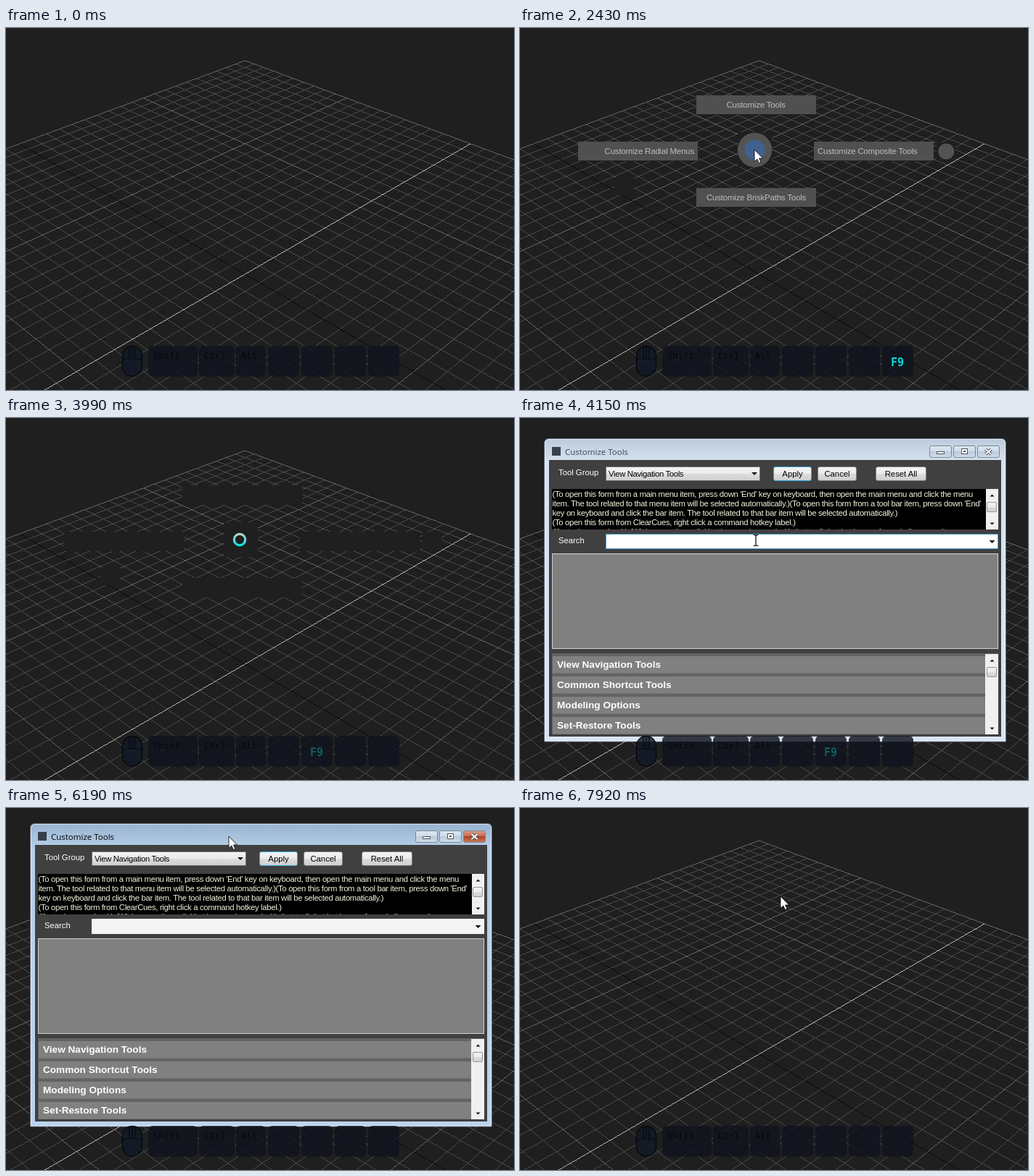
Animation, 700 px wide and 500 px high, one loop 8000 ms. Source, as an HTML page:

```html
<!DOCTYPE html>
<html lang="en">
<head>
<meta charset="utf-8">
<title>Customize Tools</title>
<style>
html, body { margin: 0; width: 100%; height: 100%; overflow: hidden; background: #1f1f1f; }
svg { display: block; width: 700px; height: 500px; }
text { font-family: "Liberation Sans", Arial, sans-serif; font-size: 11.3px; white-space: pre; }
.mid { text-anchor: middle; }
.end { text-anchor: end; }
.mono { font-family: "DejaVu Sans Mono", monospace; font-size: 12.5px; }
.menu text { font-size: 11.5px; letter-spacing: -.2px; fill: #bdbdbd; }
.tight { letter-spacing: -.33px; }
.caption { font-family: "Open Sans", sans-serif; font-size: 11.5px; }
.row { font-size: 13.6px; font-weight: bold; fill: #fff; }
</style>
</head>
<body>
<svg viewBox="0 0 700 500" xmlns="http://www.w3.org/2000/svg">
  <defs>
    <linearGradient id="face" x2="0" y2="1">
      <stop offset="0" stop-color="#f4f4f4"/><stop offset=".5" stop-color="#ebebeb"/>
      <stop offset=".5" stop-color="#dddddd"/><stop offset="1" stop-color="#cfcfcf"/>
    </linearGradient>
    <linearGradient id="hot" x2="0" y2="1">
      <stop offset="0" stop-color="#eaf6fd"/><stop offset=".5" stop-color="#d9f0fc"/>
      <stop offset=".5" stop-color="#bee6fd"/><stop offset="1" stop-color="#a7d9f5"/>
    </linearGradient>
    <linearGradient id="idle" x2="0" y2="1">
      <stop offset="0" stop-color="#bccbdc"/><stop offset=".08" stop-color="#d6e2ef"/><stop offset="1" stop-color="#d9e5f2"/>
    </linearGradient>
    <linearGradient id="live" x2="0" y2="1">
      <stop offset="0" stop-color="#98b3d0"/><stop offset=".08" stop-color="#b6cfe9"/><stop offset="1" stop-color="#bcd4ee"/>
    </linearGradient>
    <linearGradient id="red" x2="0" y2="1">
      <stop offset="0" stop-color="#dda08c"/><stop offset=".5" stop-color="#c4644b"/>
      <stop offset=".5" stop-color="#ad4025"/><stop offset="1" stop-color="#c98058"/>
    </linearGradient>
    <linearGradient id="glass" x2="0" y2="1">
      <stop offset="0" stop-color="#dfe8f2"/><stop offset=".5" stop-color="#cddae7"/>
      <stop offset=".5" stop-color="#bccbdc"/><stop offset="1" stop-color="#cfdce9"/>
    </linearGradient>
    <linearGradient id="spin" x2="0" y2="1">
      <stop offset="0" stop-color="#c3d4d6"/><stop offset=".5" stop-color="#86cfd2"/><stop offset="1" stop-color="#0be4e0"/>
    </linearGradient>
    <clipPath id="note"><rect x="44" y="98" width="598" height="56"/></clipPath>
  </defs>
  <rect width="700" height="500" fill="#1f1f1f"/>
  <g id="grid" shape-rendering="crispEdges" fill="none" stroke-width=".87"></g>
  <g id="holes" fill="#1f1f1f"></g>
  <g id="menu" class="menu"></g>
  <g id="win"></g>
  <g id="keys"></g>
  <circle id="ring" r="11" fill="#00dede" fill-opacity=".2" stroke="#00dede" stroke-width="1.5"/>
  <path id="arrow" d="M0 0V16.5L3.8 13L6.4 18.6L9 17.5L6.5 12H11.6Z" fill="#fff" stroke="#111" stroke-width=".9"/>
  <path id="beam" d="M-3.5 -7.5H-1L0 -6.5L1 -7.5H3.5M0 -6.5V6.5M-3.5 7.5H-1L0 6.5L1 7.5H3.5" fill="none" stroke="#000" stroke-width="1.2"/>
  <g id="busy"><circle r="7.7" fill="none" stroke="#0d3a3c" stroke-width="4.6"/><circle r="7.7" fill="none" stroke="url(#spin)" stroke-width="3"/></g>
</svg>
<script>
const LOOP = 8000;
const $ = id => document.getElementById(id);
const rect = (x, y, w, h, fill, extra = '') =>
  `<rect x="${x}" y="${y}" width="${w}" height="${h}" fill="${fill}" ${extra}/>`;
const text = (x, y, s, fill, extra = '') => `<text x="${x}" y="${y}" fill="${fill}" ${extra}>${s}</text>`;
const path = (d, stroke, extra = '') => `<path d="${d}" stroke="${stroke}" ${extra}/>`;

// Ground plane in perspective: u runs to the lower right, v to the lower left.
function project(u, v) {
  const s = u + v, w = 1 - .2837 * s;
  return `${(329.4 + 398.8 * (u - v) / w).toFixed(2)} ${((340 + 134.7 * s) / w).toFixed(2)}`;
}
function drawGrid() {
  const alongV = k => `M${project(k, -1)}L${project(k, 1)}`;
  const alongU = k => `M${project(-1, k)}L${project(1, k)}`;
  let minor = '', major = '';
  for (let i = -20; i <= 20; i++) {
    if (!i) continue;
    const d = alongV(i / 20) + alongU(i / 20);
    if (i % 10) minor += d; else major += d;
  }
  $('grid').innerHTML = path(minor, '#525252') + path(major, '#717171') +
    path(alongU(0), '#080808') + path(alongV(0), '#cfcfcf');
}

function drawMenu() {
  const boxes = [[243, 93], [80, 157], [405, 157], [243, 221]];
  $('holes').innerHTML = boxes.map(([x, y]) => rect(x, y, 165, 27, '#1f1f1f')).join('') +
    rect(300, 144, 47, 48, '#1f1f1f') + rect(574, 158, 26, 25, '#1f1f1f') + rect(130, 207, 27, 24, '#1f1f1f');
  $('menu').innerHTML =
    boxes.map(([x, y], i) => rect(x, y, 165, 26, '#505050', i ? '' : 'id="top"')).join('') +
    text(325, 110, 'Customize Tools', '', 'class="mid"') +
    text(240, 174, 'Customize Radial Menus', '', 'class="end"') +
    text(410, 174, 'Customize Composite Tools', '') +
    text(325.5, 238, 'Customize BriskPaths Tools', '', 'class="mid"') +
    '<circle cx="323.5" cy="168.5" r="23.7" fill="#535353"/>' +
    '<circle id="hub" cx="323.5" cy="168.5" r="14"/>' +
    '<circle cx="587.3" cy="170.5" r="11" fill="#535353"/>';
}

const button = (x, w, s, id, stroke) =>
  rect(x + .5, 67.5, w - 1, 19, 'url(#face)', `rx="2.5" stroke="${stroke}" id="${id}"`) +
  text(x + w / 2, 81, s, '#000', 'class="mid"');
const tri = (x, y, dir, r = 4) => `<path d="M${x - r} ${y - dir * r / 2}H${x + r}L${x} ${y + dir * r / 2}Z" fill="#111"/>`;
const scroll = (x, y, h, thumb) =>
  rect(x, y, 659 - x, h, '#f0f0f0') + tri(650.5, y + 9, -1, 3) + tri(650.5, y + h - 8, 1, 3) +
  rect(643.5, thumb + .5, 13, 13, 'url(#face)', 'rx="1.5" stroke="#979797"');

function drawWindow() {
  const notes = [
    "(To open this form from a main menu item, press down 'End' key on keyboard, then open the main menu and click the menu",
    "item. The tool related to that menu item will be selected automatically.)(To open this form from a tool bar item, press down 'End'",
    'key on keyboard and click the bar item. The tool related to that bar item will be selected automatically.)',
    '(To open this form from ClearCues, right click a command hotkey label.)',
    "(If a tool responds with 'Win' means the radial hot key can be used with that tool); but hot key perform similar menu item"
  ];
  const rows = ['View Navigation Tools', 'Common Shortcut Tools', 'Modeling Options', 'Set-Restore Tools'];
  const cap = (x, w, id) => rect(x + .5, 38.5, w - 1, 16, 'url(#glass)', `rx="2.5" stroke="#7a8897" id="${id}"`);
  $('win').innerHTML =
    '<path id="frame" d="M33.5 447V35Q33.5 28.5 40 28.5H663Q669.5 28.5 669.5 35V447Z" stroke="#5a6672"/>' +
    path('M34.5 446V35.5Q34.5 29.5 40.5 29.5H662.5Q668.5 29.5 668.5 35.5V446Z', '#eef4fa', 'fill="none" opacity=".7"') +
    rect(44, 40, 12, 12, '#36414d') +
    text(62, 51, 'Customize Tools', '', 'class="caption" id="title"') +
    cap(564, 31, 'min') + cap(597, 31, 'max') + cap(630, 31, 'close') +
    rect(574.5, 46.5, 10, 3, '#fff', 'stroke="#4a5561"') +
    rect(608.5, 42.5, 8, 7, '#fff', 'stroke="#4a5561"') + rect(611, 45, 3, 2, '#4a5561') +
    path('M641.5 43L649.5 50M649.5 43L641.5 50', '#4a5561', 'stroke-width="4"') +
    path('M641.5 43L649.5 50M649.5 43L641.5 50', '#fff', 'stroke-width="2"') +
    rect(40, 58, 623, 382, '#404040') +
    text(53, 79, 'Tool Group', '#fff') +
    rect(118.5, 67.5, 212, 19, 'url(#face)', 'rx="1" stroke="#707070"') +
    text(122, 81, rows[0], '#000', 'class="tight"') + tri(323, 77, 1) +
    button(349, 53, 'Apply', 'apply', '#35a5d8') +
    button(410, 54, 'Cancel', 'cancel', '#808080') +
    button(490, 70, 'Reset All', 'reset', '#808080') +
    rect(44, 98, 598, 56, '#000') +
    '<g clip-path="url(#note)" class="tight">' + notes.map((s, i) => text(44.5, 109 + 13 * i, s, '#f2f2dc')).join('') + '</g>' +
    scroll(642, 98, 56, 116) +
    text(53, 173, 'Search', '#fff') +
    rect(118.5, 160.5, 540, 20, '#f4f4f4', 'id="search"') + tri(650.5, 171, 1) +
    rect(44.5, 187.5, 614, 131, '#808080', 'stroke="#d2d2d2"') +
    rect(44, 325, 615, 112, '#636363') +
    rows.map((s, i) => rect(45, 329 + 28 * i, 596, 23.5, '#808080') + text(51, 345 + 28 * i, s, '#fff', 'class="row"')).join('') +
    scroll(641, 326, 111, 344);
}

function drawKeys() {
  const caps = [[196, 68, 'Shift'], [266, 49, 'Ctrl'], [317, 41, 'Alt'], [361, 43], [407, 43], [453, 43], [499, 43]];
  const ink = '#07080b';
  $('keys').innerHTML =
    rect(160.5, 439.5, 27, 41.5, '#111926', `rx="13.5" fill-opacity=".82" stroke="${ink}" stroke-width="1.4"`) +
    '<path id="press" d="M163 453V450Q164 443 171 441V453Z" fill="#00dede"/>' +
    path('M161 457H187M170 440V453Q170 457 174 457Q178 457 178 453V440M174 440V456', ink, 'fill="none" stroke-width="1.1"') +
    caps.map(([x, w, s]) => rect(x, 439, w, 42.5, '#0f131d', 'rx="6" fill-opacity=".82"') +
      (s ? text(x + 6.5, 457, s, ink, 'class="mono"') : '')).join('') +
    text(0, 467, 'F9', '', 'class="mono" style="font-size:15px;font-weight:bold" id="hit"');
}

const track = [
  [220, 531, 429], [940, 335, 203], [1740, 335, 203], [2190, 323, 168], [2820, 323, 168], [3210, 323, 105],
  [3450, 323, 105], [3530, 322, 168], [4100, 322, 168], [4150, 325, 169], [4470, 325, 169], [5330, 307, 59], [5640, 307, 46],
  [5800, 307, 46], [5960, 307, 39], [6900, 307, 39], [7240, 440, 83], [7360, 452, 72], [7700, 452, 72], [7920, 359, 122]
];
const presses = [[1170, 1560], [3370, 3530], [5720, 6190], [7520, 7600]];
const hits = [[2350, 511, '#00dede'], [3760, 466, '#099c9d'], [3990, 419, '#0d5f62'], [4620, 0, 'none']];

const clamp = k => Math.max(0, Math.min(1, k));
const ease = k => k * k * (3 - 2 * k);
const span = (t, a, b) => clamp((t - a) / (b - a));
const within = (t, a, b) => t >= a && t < b;
const show = (id, on) => $(id).setAttribute('visibility', on ? 'visible' : 'hidden');
const set = (id, attrs) => { for (const k in attrs) $(id).setAttribute(k, attrs[k]); };

function cursorAt(t) {
  let i = 0;
  while (i < track.length - 2 && t >= track[i + 1][0]) i++;
  const [a, x, y] = track[i], [b, p, q] = track[i + 1], k = ease(span(t, a, b));
  return [x + (p - x) * k, y + (q - y) * k];
}

function render(t) {
  const [x, y] = cursorAt(t);
  const open = within(t, 4150, 7920), active = t >= 5720;
  const busy = within(t, 3530, 4150), beam = within(t, 4150, 5400) && y > 160;
  const pressed = presses.some(([a, b]) => within(t, a, b));

  show('holes', within(t, 2430, 7770));
  show('menu', within(t, 2350, 3450));
  set('menu', { opacity: t < 2430 ? .5 : 1 });
  const over = t >= 2850 && y < 119;
  set('top', { fill: over ? '#40608f' : '#505050' });
  set('hub', { fill: over ? '#535353' : '#40608f' });

  show('win', open);
  set('win', {
    transform: `translate(0 ${-7 * ease(span(t, 5800, 5960))})`,
    opacity: 1 - span(t, 7690, 7920)
  });
  set('frame', { fill: active ? 'url(#live)' : 'url(#idle)' });
  set('title', { fill: active ? '#000' : '#3d4752' });
  set('close', { fill: active ? 'url(#red)' : 'url(#glass)' });
  set('search', { fill: beam ? '#fff' : '#f4f4f4', stroke: beam ? '#4aa3d6' : '#fafafa' });
  const hover = t > 7000 && x > 410 && y < 81;
  set('cancel', { fill: hover ? 'url(#hot)' : 'url(#face)', stroke: hover ? '#3c7fb1' : '#808080' });

  const hit = hits.filter(h => t >= h[0]).pop() || [0, 0, 'none'];
  set('hit', { x: hit[1], fill: hit[2] });
  show('press', pressed);
  show('ring', pressed);
  show('arrow', t >= 220 && !busy && !beam);
  show('beam', beam);
  show('busy', busy);
  for (const id of ['ring', 'arrow', 'beam', 'busy']) set(id, { transform: `translate(${x} ${y})` });
}

drawGrid();
drawMenu();
drawWindow();
drawKeys();
const start = performance.now();
function tick() {
  render((performance.now() - start) % LOOP);
  requestAnimationFrame(tick);
}
tick();
</script>
</body>
</html>
```
